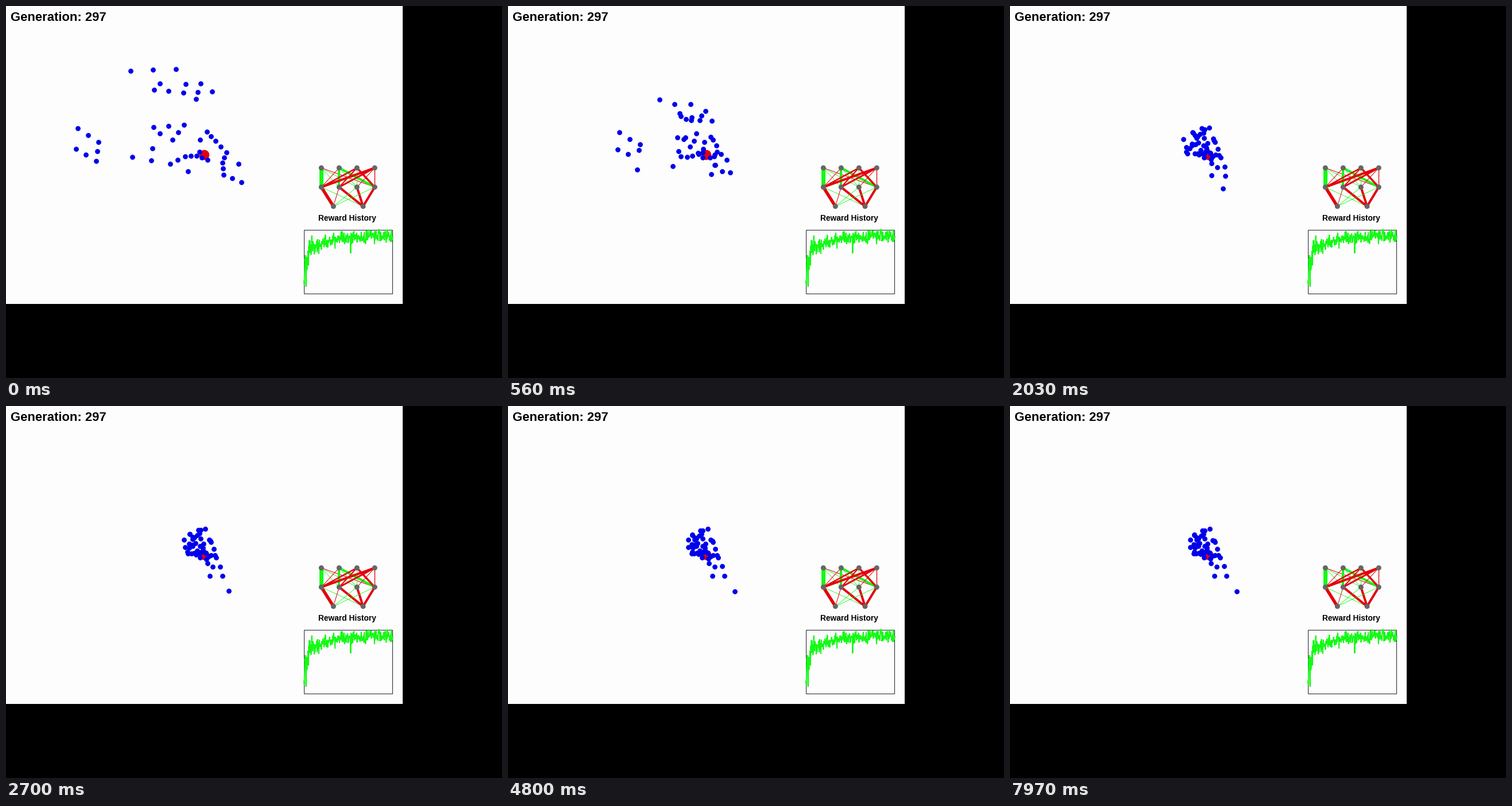
A matplotlib script that plays this animation: 864 px wide and 648 px high, repeating every 8 s.

```python
import numpy as np
import matplotlib.pyplot as plt
from matplotlib.animation import FuncAnimation
from matplotlib.patches import Circle, Rectangle

W, H, DPI = 864, 648, 100
INTERVAL, FRAMES = 40, 200
PX = 72 / DPI                      # points per pixel

PAPER, BLUE, RED = "#fdfdfd", "#0000ec", "#e4000a"
GREEN, GRAY = "#14fa14", "#666666"

GOAL = np.array([345.5, 259.5])
TOP_SPEED = 0.125                  # px per ms
DECAY = 0.0017                     # slowdown near the resting place

# Chains of agents: one at each key point and one halfway between
CHAINS = [
    [(124, 212), (160, 236), (156, 269), (121, 248)],
    [(216, 112), (295, 109), (330, 161)],
    [(257, 145), (308, 150), (358, 148)],
    [(256, 210), (309, 206), (289, 232), (219, 262),
     (285, 274), (311, 261), (331, 260), (350, 267)],
    [(349, 218), (364, 234), (383, 254), (376, 272), (378, 293), (409, 306)],
]
LONERS = [(267, 134), (338, 134), (267, 221), (316, 287),
          (404, 274), (337, 232), (336, 253)]
STRAYS = {4: (395, 323), 23: (356, 296), 46: (377, 296)}


def chain(keys):
    x, y = np.transpose(keys)
    i = np.arange(len(keys))
    half = np.arange(2 * len(keys) - 1) / 2
    return np.column_stack([np.interp(half, i, x), np.interp(half, i, y)])


def resting_places(start):
    """Agents stop short of the goal, on the side they came from."""
    spread = np.random.default_rng(3).uniform(-10, 10, start.shape)
    short = np.array([24, 38]) * np.tanh((start - GOAL) / [70, 90])
    rest = GOAL + [0, -3] + short + spread
    for i, place in STRAYS.items():
        rest[i] = place
    return rest


START = np.vstack([chain(keys) for keys in CHAINS] + [LONERS])
REST = resting_places(START)
GAP = START - REST
DIST = np.maximum(np.hypot(*GAP.T), 1e-6)


def agents(t):
    """Full speed towards rest, then an exponential slowdown."""
    brake = TOP_SPEED / DECAY
    cruise = np.maximum(0, (DIST - brake) / TOP_SPEED)
    coast = np.minimum(DIST, brake) * np.exp(-DECAY * np.maximum(0, t - cruise))
    left = np.where(t < cruise, DIST - TOP_SPEED * t, coast)
    return REST + GAP * (left / DIST)[:, None]


fig = plt.figure(figsize=(W / DPI, H / DPI), dpi=DPI, facecolor="black")
ax = fig.add_axes([0, 0, 1, 1])
ax.set_xlim(0, W)
ax.set_ylim(H, 0)
ax.axis("off")
ax.add_patch(Rectangle((0, 0), 691, 518.5, fc=PAPER, lw=0))


def label(x, y, text, size):
    ax.text(x, y, text, family="Liberation Sans", weight="bold",
            size=size * PX, color="black", va="baseline")


def line(x, y, color, width, z=2):
    ax.plot(x, y, color=color, lw=width * PX, zorder=z,
            solid_capstyle="butt", solid_joinstyle="miter")


def network():
    inputs = [(549.3 + 31 * i, 282) for i in range(4)]
    hidden = [(x, 315.5) for x, _ in inputs]
    outputs = [(570.3, 349), (622, 349)]
    # One row per source node; positive is green, negative red
    first = [(7, 0.7, 0.8, -1), (-1, 4, 0.8, 4),
             (-2.5, -2, 0.8, -3.5), (-4, -3, -1, -1.3)]
    second = [(-5.5, 0.8), (-1, -4), (0.8, -4), (0.8, -4)]
    for tops, ends, weights in ((inputs, hidden, first),
                                (hidden, outputs, second)):
        for (x0, y0), row in zip(tops, weights):
            for (x1, y1), w in zip(ends, row):
                line((x0, x1), (y0, y1), GREEN if w > 0 else RED, abs(w))
    for node in inputs + hidden + outputs:
        ax.add_patch(Circle(node, 4.5, fc=GRAY, lw=0, zorder=3))


def reward_chart():
    ax.add_patch(Rectangle((518.5, 389.5), 154.6, 111, fill=False,
                           ec="#202030", lw=PX, zorder=2))
    n = np.arange(297)
    noise = np.random.default_rng(7).normal(size=n.size)
    mean = 400 + 50 * np.exp(-n / 14) + 28 * np.exp(-n / 80)
    y = mean + noise * (6.5 + 30 * np.exp(-n / 14))
    y[155] = 431
    line(519 + n * 155.5 / 296, np.clip(y, 389.5, 500.5), GREEN, 1.9, 3)


label(8, 26, "Generation: 297", 22)
label(544.5, 374.3, "Reward History", 13.8)
network()
reward_chart()
ax.add_patch(Circle(GOAL, 8.8, fc=RED, lw=0, zorder=4))
dots = ax.scatter(*START.T, s=(8.8 * PX) ** 2, c=BLUE, lw=0, zorder=5)


def draw(frame):
    dots.set_offsets(agents(frame * INTERVAL) + 0.5)
    return dots,


anim = FuncAnimation(fig, draw, frames=FRAMES, interval=INTERVAL,
                     repeat=True, repeat_delay=0, blit=False)
plt.show()
```
